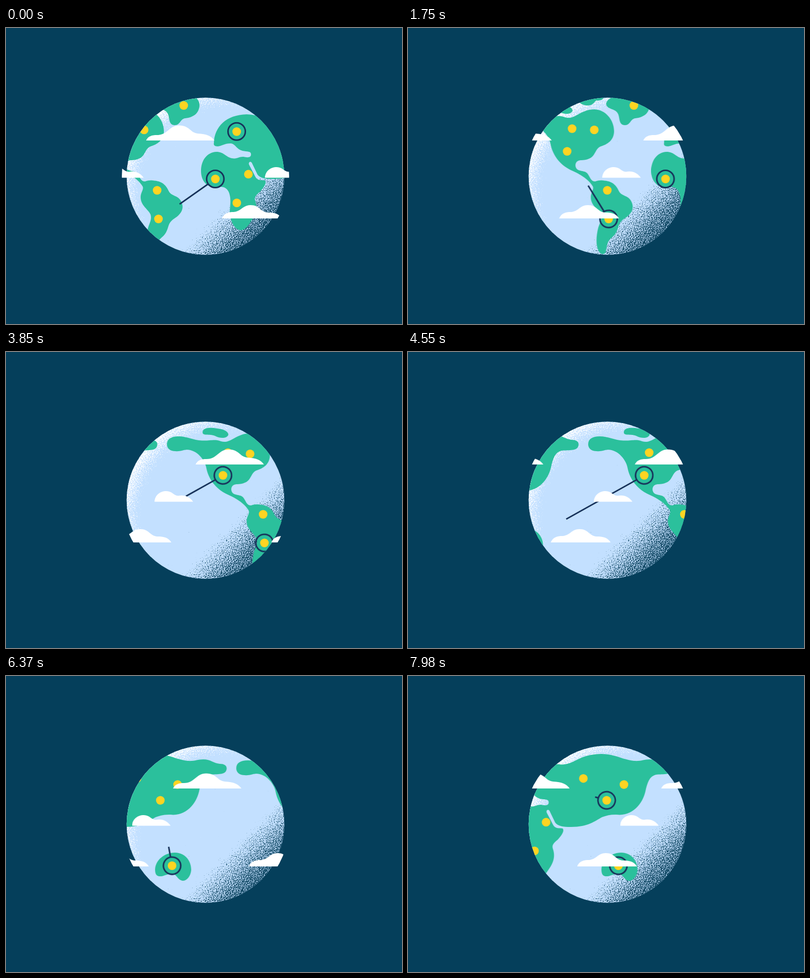
These frames come from a looping animation (800x600 px, 8000 ms). An HTML page without scripts:

```html
<!DOCTYPE html>
<html lang="en">
<head>
<meta charset="utf-8">
<title>Turning globe</title>
<style>
  html, body { margin: 0; width: 100%; height: 100%; overflow: hidden; background: #053f5b; }
  svg { display: block; width: 100vw; height: 100vh; }

  .land { fill: #2bc09c; }
  .dots { fill: #fdd422; }
  .cloud { fill: #fff; }
  .route, .ring { fill: none; stroke: #17325a; stroke-width: 3.1; }

  /* Stepped scrolling: one pose every 70 ms */
  .map { animation: turn 8s -2ms infinite; }
  .sky { animation: drift 8s -2ms infinite; }
  @keyframes turn {
    0% { transform: translateX(0); animation-timing-function: steps(114); }
    99.75%, 100% { transform: translateX(443.7px); }
  }
  @keyframes drift {
    0% { transform: translateX(0); animation-timing-function: steps(55); }
    48.125% { transform: translateX(423px); animation-timing-function: steps(19); }
    64.75% { transform: translateX(566px); animation-timing-function: steps(17); }
    79.625% { transform: translateX(700.5px); animation-timing-function: steps(23); }
    99.75%, 100% { transform: translateX(874.5px); }
  }

  /* Routes grow, wait, then shrink from their start */
  .route { stroke-dasharray: 1 2; animation: travel 8s linear var(--at) infinite backwards; }
  .route.long { animation-name: travel-long; }
  @keyframes travel {
    0% { stroke-dashoffset: 1; }
    10%, 13.75% { stroke-dashoffset: 0; }
    20%, 100% { stroke-dashoffset: -1; }
  }
  @keyframes travel-long {
    0% { stroke-dashoffset: 1; }
    22.4%, 26.2% { stroke-dashoffset: 0; }
    32.4%, 100% { stroke-dashoffset: -1; }
  }

  /* Rings are drawn on arrival and then pop */
  .ring.drawn { stroke-dasharray: 1 2; animation: arrive 8s linear var(--at) infinite backwards; }
  @keyframes arrive {
    0% { stroke-dashoffset: 1; transform: scale(1); }
    5.2% { stroke-dashoffset: 0; }
    6.5% { transform: scale(1); animation-timing-function: ease-out; }
    9% { transform: scale(1.16); animation-timing-function: ease-in-out; }
    11.8% { transform: scale(1); }
    60% { stroke-dashoffset: 0; opacity: 1; }
    60.01%, 100% { stroke-dashoffset: 0; opacity: 0; transform: scale(1); }
  }
</style>
</head>
<body>
<svg viewBox="0 0 800 600">
  <defs>
    <clipPath id="globe"><circle cx="403" cy="300.5" r="159.3"/></clipPath>
    <clipPath id="air"><circle cx="403" cy="300.5" r="169"/></clipPath>

    <linearGradient id="shade" gradientUnits="userSpaceOnUse" x1="395" y1="395" x2="463.5" y2="463.5">
      <stop offset="0" stop-opacity="0"/>
      <stop offset=".25" stop-opacity=".42"/>
      <stop offset=".5" stop-opacity=".6"/>
      <stop offset=".75" stop-opacity=".74"/>
      <stop offset="1" stop-opacity=".82"/>
    </linearGradient>
    <radialGradient id="shine" gradientUnits="userSpaceOnUse" cx="442" cy="334" r="212">
      <stop offset=".75" stop-opacity="0"/>
      <stop offset=".86" stop-opacity=".5"/>
      <stop offset="1" stop-opacity=".92"/>
    </radialGradient>

    <!-- Turns a gradient's opacity into grain of matching density -->
    <filter id="dark-grain" x="0" y="0" width="1" height="1" color-interpolation-filters="sRGB">
      <feTurbulence type="fractalNoise" baseFrequency=".55" numOctaves="2" seed="4" result="noise"/>
      <feComposite in="noise" in2="SourceAlpha" operator="arithmetic" k2="5" k3="3.2" k4="-4.28" result="grain"/>
      <feFlood flood-color="#053f5b"/>
      <feComposite in2="grain" operator="in"/>
    </filter>
    <filter id="light-grain" x="0" y="0" width="1" height="1" color-interpolation-filters="sRGB">
      <feTurbulence type="fractalNoise" baseFrequency=".55" numOctaves="2" seed="9" result="noise"/>
      <feComposite in="noise" in2="SourceAlpha" operator="arithmetic" k2="5" k3="3.2" k4="-4.28" result="grain"/>
      <feFlood flood-color="#fff"/>
      <feComposite in2="grain" operator="in"/>
    </filter>

    <circle id="dot" r="8.7"/>

    <g id="east">
      <path class="land" d="M420 233C421 200 445 176 486 175C497 175 505 178 514 179C530 181 540 176 552 170
        C566 162 584 158 602 158C632 159 645 170 667 172C683 173 686 169 699 169C714 169 720 177 732 178
        C742 178 747 182 746 189C744 199 735 199 717 199.500C699 200 695 215 691 231C686 257 667 281 638 281.500
        C624 280 614 282 603 286C588 294 575 306 540 306C525 306 514 305 508 297L497 274
        C495 269 489 271 491 277L504 302C508 310 517 308 523 309C528 314 520 324 513 332
        C503 340 501 344 504 352C508 365 505 377 497 389C490 400 483 410 474 410C460 408 453 390 452 372
        C454 352 454 345 451 335C448 326 442 322 434 322C425 324 410 323 403 315C396 308 394 298 394 290
        C394 268 406 252 425 251C440 251 445 262 456 264C466 266 472 260 480 261C488 263 495 263 495 256
        C495 249 487 251 478 249C466 246 464 236 455 234C443 233 436 239 428 240C421 240 419 237 420 233Z"/>
      <g class="dots">
        <use href="#dot" x="466" y="210"/>
        <use href="#dot" x="423" y="306"/>
        <use href="#dot" x="489.7" y="296.3"/>
        <use href="#dot" x="466.3" y="354.5"/>
        <use href="#dot" x="565" y="207.7"/>
        <use href="#dot" x="647" y="220"/>
        <use href="#dot" x="612.1" y="252"/>
      </g>
    </g>

    <g id="clouds" class="cloud">
      <path transform="translate(283)" d="M0 228C4 219 12 217 22 217C44 217 46 197.500 67 197.500
        C89 198 88 212 105 214C122 215 131 218 138 228Z"/>
      <path transform="translate(523)" d="M0 303.500C1 290 11 282 24 282C36 282 38 291 48 291.500
        C60 289 71 293 78 303.500Z"/>
      <path transform="translate(436)" d="M0 386C5 375 13 373 24 373C39 372 42 359 58 359
        C77 359 77 373 93 374C106 374 115 376 121 386Z"/>
    </g>
  </defs>

  <rect width="800" height="600" fill="#053f5b"/>
  <circle cx="403" cy="300.5" r="159.3" fill="#c3e0ff"/>

  <g clip-path="url(#globe)">
    <circle cx="403" cy="300.5" r="160" fill="url(#shine)" filter="url(#light-grain)"/>
    <circle cx="403" cy="300.5" r="160" fill="url(#shade)" filter="url(#dark-grain)"/>

    <g class="map">
      <use href="#east"/>
      <use href="#east" x="-654.5"/>
      <g class="land">
        <!-- Americas -->
        <path d="M111 187C111 176 120 171 134 171C152 171 164 179 182 179.500C200 180 208 176 220 181
          C240 187 250 165 279 165C301 165 319 186 319 209C319 228 305 236 292 240C280 245 282 260 268 265
          C260 269 252 267 247 269C239 272 239 284 247 288C256 291 262 290 266 296C271 303 272 311 281 311
          C287 309 293 308 300 309.500C317 311 324 320 329 331C334 341 347 339 353 350
          C361 364 355 374 346 382C336 389 331 392 328 402C324 416 320 420 313 426
          C303 434 305 446 302 454C300 460 293 459 290 455C282 445 282 425 287 405
          C290 395 295 388 292 378C288 368 272 360 272 343C272 333 279 327 276 321
          C268 307 250 296 236 290C212 280 196 260 191 237C189 220 172 198 151 198
          C141 199 138 202 128 201C117 201 111 195 111 187Z"/>
        <!-- Northern islands -->
        <path d="M183 163C183 152 200 153 212 155C228 156 236 163 235 168C232 176 218 175 210 171C200 165 183 171 183 163Z"/>
        <path d="M245 140C245 152 256 157 266 157C276 157 278 151 283 147C292 147 298 146 299 138Z"/>
        <path d="M303 153C305 145 312 142 320 138L380 138C388 144 391 150 391 157C390 172 380 181 362 183
          C352 184 352 197 341 197C328 197 331 182 327 174C322 162 303 166 303 153Z"/>
        <!-- Australia -->
        <path d="M-53 392C-52 372 -33 358 -13 358C8 358 20 375 20 393C19 407 10 416 2 415
          C-8 413 -9 402 -18 401C-28 400 -36 407 -45 406C-52 405 -53 398 -53 392Z"/>
      </g>
      <g class="dots">
        <use href="#dot" x="359" y="157"/>
        <use href="#dot" x="234.2" y="204"/>
        <use href="#dot" x="279" y="206.5"/>
        <use href="#dot" x="224.2" y="250"/>
        <use href="#dot" x="305.3" y="329"/>
        <use href="#dot" x="308" y="387"/>
        <use href="#dot" x="-18.7" y="384.5"/>
      </g>

      <path class="route" pathLength="1" style="--at:-.536s" d="M408.700 316.100L322.300 376.900"/>
      <path class="route" pathLength="1" style="--at:1.358s" d="M298.900 372.100L233.300 264.900"/>
      <path class="route long" pathLength="1" style="--at:3.348s" d="M208.900 259L-3 377.800"/>
      <path class="route" pathLength="1" style="--at:6.2s" d="M-21.800 367.300L-39.300 269.200"/>
      <path class="route" pathLength="1" style="--at:7.935s" d="M-59.200 247.200L-171.700 214.800"/>

      <circle class="ring" cx="466" cy="209.700" r="17.500"/>
      <circle class="ring" cx="422.800" cy="306" r="17.500"/>
      <g transform="translate(308 387) rotate(-35)"><circle class="ring drawn" r="17.500" pathLength="1" style="--at:.264s"/></g>
      <g transform="translate(224.2 250) rotate(58.500)"><circle class="ring drawn" r="17.500" pathLength="1" style="--at:2.15s"/></g>
      <g transform="translate(-18.7 384.500) rotate(-24)"><circle class="ring drawn" r="17.500" pathLength="1" style="--at:5.142s"/></g>
      <g transform="translate(-42.4 252) rotate(80)"><circle class="ring drawn" r="17.500" pathLength="1" style="--at:7s"/></g>
    </g>
  </g>

  <g clip-path="url(#air)">
    <g class="sky">
      <use href="#clouds"/>
      <use href="#clouds" x="-323"/>
      <use href="#clouds" x="-646"/>
      <use href="#clouds" x="-969"/>
    </g>
  </g>
</svg>
</body>
</html>
```
